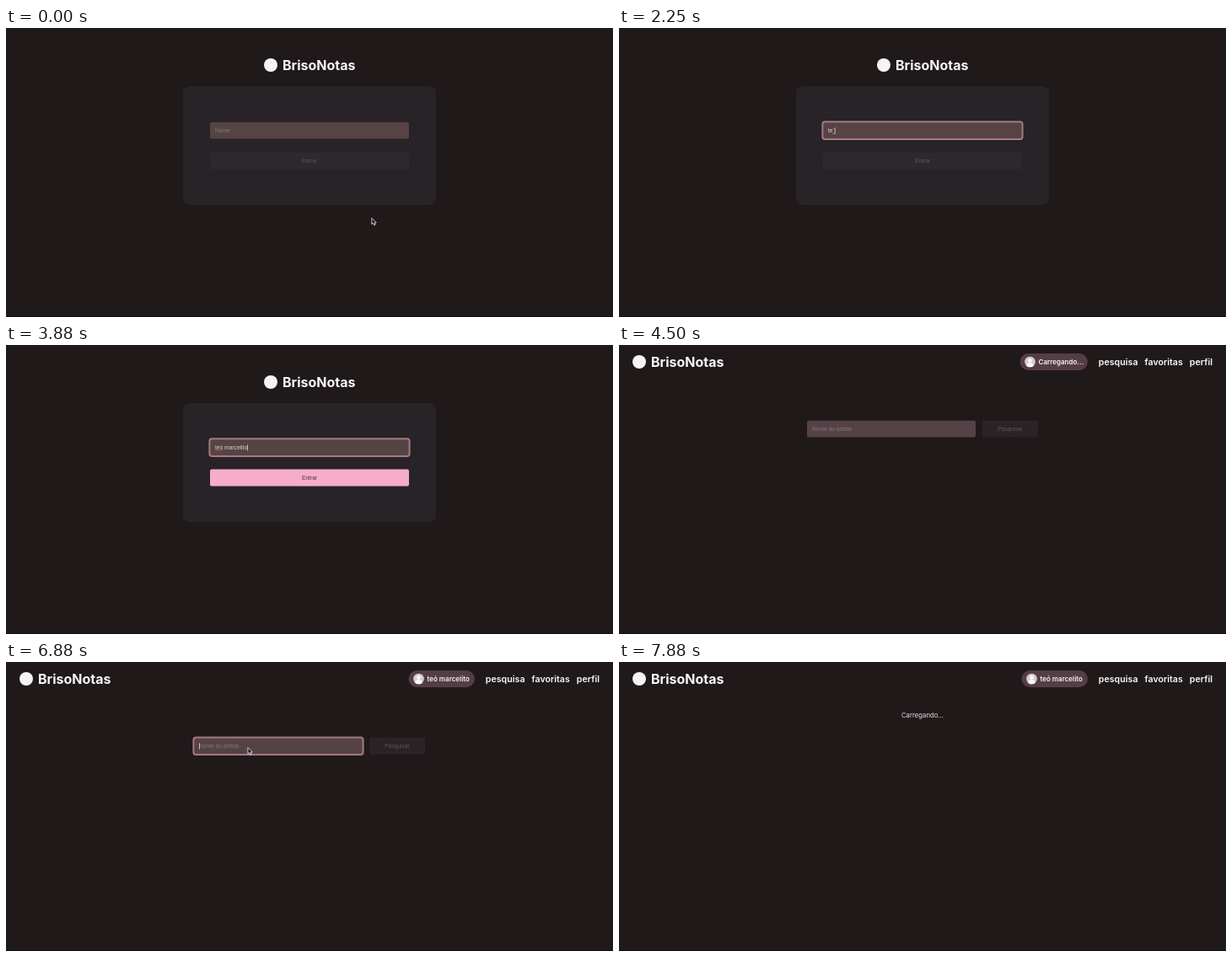
An HTML page with a canvas for the animation above (8000 ms loop, 720 by 343 pixels).

```html
<!DOCTYPE html>
<html lang="pt-BR">
<head>
<meta charset="utf-8">
<title>BrisoNotas</title>
<style>
html, body { margin: 0; width: 100%; height: 100%; overflow: hidden; background: #1f191a; }
canvas { display: block; width: 720px; height: 343px; }
</style>
</head>
<body>
<canvas id="stage"></canvas>
<script>
const LOOP = 8000, STEP = 125, W = 720, H = 343;
const BRAND = 'BrisoNotas', USER = 'teó marcelito', QUERY = 'suave';
const SANS = 'Inter, sans-serif';
const FIELD = '6.667px "Liberation Sans", Arial, sans-serif';
const BG = '#1f191a', PINK = '#f5adc8', INK = '#ddd1d4';

// Moments of the story, in ms.
const FOCUS = 1500, ACCENT = 2125, VALID = 2375, SUBMIT = 4000, HOME = 4375;
const ENTER = 5875, PROFILE = 6375, REFOCUS = 6750, TYPE = 7125, RESULT = 7875;

const canvas = document.getElementById('stage');
const ctx = canvas.getContext('2d');
const dpr = window.devicePixelRatio || 1;
canvas.width = W * dpr;
canvas.height = H * dpr;

const clamp = v => Math.max(0, Math.min(1, v));
const ramp = (t, start, end) => clamp((t - start) / (end - start));
const mix = (a, b, p) => a + (b - a) * p;
const easeOut = p => 1 - (1 - p) ** 3;

// Number of keys pressed when `count` keys are spread evenly from start to end.
function keys(t, start, end, count) {
  return t < start ? 0 : 1 + Math.floor((count - 1) * ramp(t, start, end));
}

function box(x, y, w, h, r, fill) {
  ctx.beginPath();
  ctx.roundRect(x, y, w, h, r);
  ctx.fillStyle = fill;
  ctx.fill();
}

function disc(x, y, r, fill) {
  ctx.beginPath();
  ctx.arc(x, y, r, 0, Math.PI * 2);
  ctx.fillStyle = fill;
  ctx.fill();
}

function text(str, x, y, font, fill, align = 'left') {
  ctx.font = font;
  ctx.fillStyle = fill;
  ctx.textAlign = align;
  ctx.fillText(str, x, y);
}

function brand(x, y) {
  disc(x + 8, y, 8, '#f5f3f4');
  text(BRAND, x + 22, y + 5.7, `700 16px ${SANS}`, '#f8f5f6');
}

function field({ x, y, w, fill, hint, value, focus }) {
  const h = 19.8, base = y + h / 2 + 2.4;
  box(x, y, w, h, 2, fill);
  text(value || hint, x + 6, base, FIELD, value ? INK : '#86767a');
  if (focus) {
    const end = x + 6 + (value ? ctx.measureText(value).width : 0);
    ctx.beginPath();
    ctx.roundRect(x - 0.6, y - 0.4, w + 1.2, h + 0.8, 3);
    ctx.lineWidth = 2;
    ctx.strokeStyle = `rgba(178,130,142,${0.9 * focus})`;
    ctx.stroke();
    ctx.fillStyle = '#eee4e7';
    ctx.fillRect(end, base - 5.8, 0.7, 7.4);
  }
  return base;
}

function button(x, y, w, label, level, idle) {
  box(x, y, w, 19.8, 2, idle);
  ctx.globalAlpha = level;
  box(x, y, w, 19.8, 2, PINK);
  ctx.globalAlpha = 1;
  text(label, x + w / 2, y + 12.2, FIELD, level ? '#5a3342' : '#5c5559', 'center');
}

function loading(y) {
  text('Carregando...', 360, y, `400 7.75px ${SANS}`, '#e8e1e3', 'center');
}

function login(t) {
  brand(306, 44);
  box(210, 69, 300, 141, 8, '#282327');
  if (t >= SUBMIT) return loading(143);

  const composing = t >= ACCENT && t < VALID;
  const count = keys(t, 1750, 1875, 2) + keys(t, VALID, 2750, 2) + keys(t, 3000, 3875, 9);
  const typed = USER.slice(0, count);
  const base = field({
    x: 242, y: 111.7, w: 236, fill: '#564344', hint: 'Nome',
    value: composing ? typed + '´' : typed, focus: t >= FOCUS ? 1 : 0
  });
  ctx.font = FIELD;
  if (composing) {
    ctx.fillStyle = INK;
    ctx.fillRect(248 + ctx.measureText(typed).width, base + 1, 2.3, 0.6);
  }
  if (count > 3) {
    const end = ctx.measureText(USER.slice(0, 3)).width;
    for (let x = 0.8; x < end; x += 1.8) disc(248 + x, base + 1.3, 0.65, '#d8454b');
  }
  button(242, 147.6, 236, 'Entrar', ramp(t, VALID - STEP, VALID + STEP), '#2e292c');
}

function avatar(x, y) {
  ctx.save();
  disc(x, y, 6.3, '#d3cfd1');
  ctx.clip();
  disc(x, y - 1.6, 2.3, '#fbfafa');
  disc(x, y + 5.2, 4.2, '#fbfafa');
  ctx.restore();
}

function header(t) {
  brand(16, 20);
  const ready = t >= PROFILE;
  const left = ready ? 477.5 : 475.5;
  box(left, 10, 556 - left, 20, 10, '#553d45');
  avatar(left + 12, 20);
  text(ready ? USER : 'Carregando...', left + 22, 23, `600 8px ${SANS}`, '#f8f2f4');

  let right = 704;
  for (const link of ['perfil', 'favoritas', 'pesquisa']) {
    text(link, right, 24, `600 10.667px ${SANS}`, '#fcf9fa', 'right');
    right -= ctx.measureText(link).width + 8;
  }
}

function search(t) {
  header(t);
  if (t >= RESULT) return loading(65.7);
  field({
    x: 223, y: 89.8, w: 200, fill: '#554247', hint: 'Nome do artista',
    value: QUERY.slice(0, keys(t, TYPE, TYPE + STEP, 2) + keys(t, 7500, 7750, 3)),
    focus: ramp(t, REFOCUS - STEP, REFOCUS + STEP)
  });
  button(431, 89.8, 66, 'Pesquisar', ramp(t, TYPE, TYPE + 2.6 * STEP), '#2a2427');
}

const arrowShape = new Path2D('M0 0V7.4L1.7 5.9L2.9 8.5L4.2 7.9L3.1 5.4H5.4Z');

function arrow(x, y) {
  ctx.save();
  ctx.translate(x + 0.9, y + 0.6);
  ctx.fillStyle = '#141112';
  ctx.fill(arrowShape);
  ctx.lineWidth = 0.8;
  ctx.lineJoin = 'round';
  ctx.strokeStyle = '#f4f1f2';
  ctx.stroke(arrowShape);
  ctx.restore();
}

function pointer(t) {
  if (t < 1750) {
    const up = ramp(t, 0, STEP);
    const back = ramp(t, 250, 375);
    const aim = ramp(t, 750, 1125);
    arrow(433 + 10 * up - 24 * back - 58 * aim, 225 - 102 * up - 2 * aim);
  } else if (t >= ENTER && t < TYPE) {
    const p = easeOut(ramp(t, ENTER, REFOCUS - STEP));
    arrow(mix(304, 286, p), mix(128, 101, p));
  }
}

function draw(now) {
  const t = Math.floor((now % LOOP) / STEP) * STEP;
  ctx.setTransform(dpr, 0, 0, dpr, 0, 0);
  ctx.fillStyle = BG;
  ctx.fillRect(0, 0, W, H);
  if (t < HOME) login(t);
  else search(t);
  ctx.fillStyle = '#110d0e';
  ctx.fillRect(0, 342, W, 1);
  pointer(t);
}

const start = performance.now();
function tick() {
  draw(performance.now() - start);
  requestAnimationFrame(tick);
}
tick();
</script>
</body>
</html>
```
